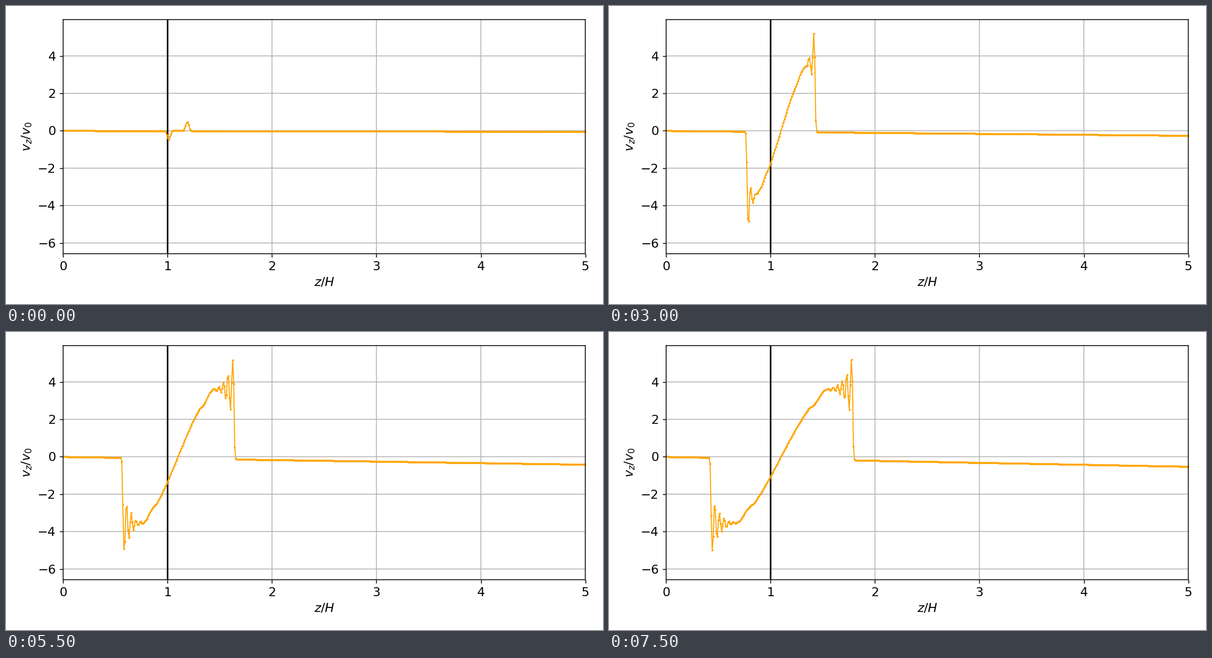
A matplotlib script for the animation above (8 s loop, 1058 px wide and 529 px high).

```python
import matplotlib.pyplot as plt
import numpy as np
from matplotlib.animation import FuncAnimation

W, H, DPI = 1058, 529, 132.25
FRAMES, STEP = 16, 500
LEFT, RIGHT, TOP, BOTTOM = 101.3, 1026.6, 24.2, 439.7
CENTER = 1.0992                   # blast centre in z
UNIT = (RIGHT - LEFT) / 5         # pixels per unit of z

plt.rcParams.update({"font.family": "DejaVu Sans", "font.size": 12,
                     "path.snap": False})


def front_distance(t, speed, drag):
    """Shock distance from the centre: speeding up for 2 s, then slowing."""
    early, late = min(t, 2), max(t - 2, 0)
    return (20.1 + 7 * early + 2.5 * early ** 2
            + speed * late - drag * late ** 2)


def ringing(depth, t):
    """Damped oscillation behind the shock, spreading inwards with time."""
    x = np.maximum(depth - 3, 0)
    growth = np.clip((t - 2 - 0.04 * x) / (0.9 + 0.16 * x), 0, 1)
    return 1.6 * growth * np.exp(-x / 12) * np.cos(2 * np.pi * x / 8.2)


def body(u, t):
    """Straight ramp that bends into a rounded, slightly kinked shoulder."""
    young = 3.7 * np.minimum(u / 0.85, 1)
    kink = np.sin(2 * np.pi * np.clip((u - 0.4) / 0.3, 0, 1))
    mature = 3.65 * np.sin(np.pi / 2 * np.minimum(u / 0.8, 1)) - 0.13 * kink
    age = np.clip((t - 2) / 2, 0, 1)
    strength = 0.13 + 0.87 * np.sin(np.pi / 2 * min(t / 1.85, 1))
    return strength * (young + age * (mature - young))


def half_wave(s, t, speed, drag):
    """Speed at distance s from the centre, and the share inside the blast."""
    front = front_distance(t, speed, drag)
    start = 10 * max(1 - t, 0)
    u = np.clip((s - start) / (front - 3 - start), 0, 1)
    width = np.interp(t, [2, 3], [0.9, 0.6])
    inside = (1 + np.tanh((front - s - 0.4) / (2 * width))) / 2
    return body(u, t) + ringing(front - s, t), inside


z = np.linspace(0, 5, 500)
offset = (z - CENTER) * UNIT


def velocity(t):
    up, in_up = half_wave(np.abs(offset), t, 17.2, 0.36)
    down, in_down = half_wave(np.abs(offset), t, 16.9, 0.42)
    wave = np.where(offset > 0, up, -0.98 * down)
    inside = np.where(offset > 0, in_up, in_down)
    infall = -(0.045 + 0.076 * t - 0.0016 * t * t) * z / 5
    return wave * inside + infall * (1 - inside)


fig = plt.figure(figsize=(W / DPI, H / DPI), dpi=DPI, facecolor="white")
ax = fig.add_axes([LEFT / W, 1 - BOTTOM / H,
                   (RIGHT - LEFT) / W, (BOTTOM - TOP) / H])
ax.set(xlim=(0, 5), ylim=(-6.575, 5.94), xlabel="$z/H$", ylabel="$v_z/v_0$")
ax.set_xticks(range(6))
ax.set_yticks(range(-6, 5, 2))
ax.grid(True)

ax.axvline(1, color="black", lw=1.5)
curve, = ax.plot(z, velocity(0), color="orange", lw=1, marker=".", ms=2)


def update(i):
    curve.set_ydata(velocity(i * STEP / 1000))
    return curve,


anim = FuncAnimation(fig, update, frames=FRAMES, interval=STEP,
                     repeat=True, repeat_delay=0)
plt.show()
```
